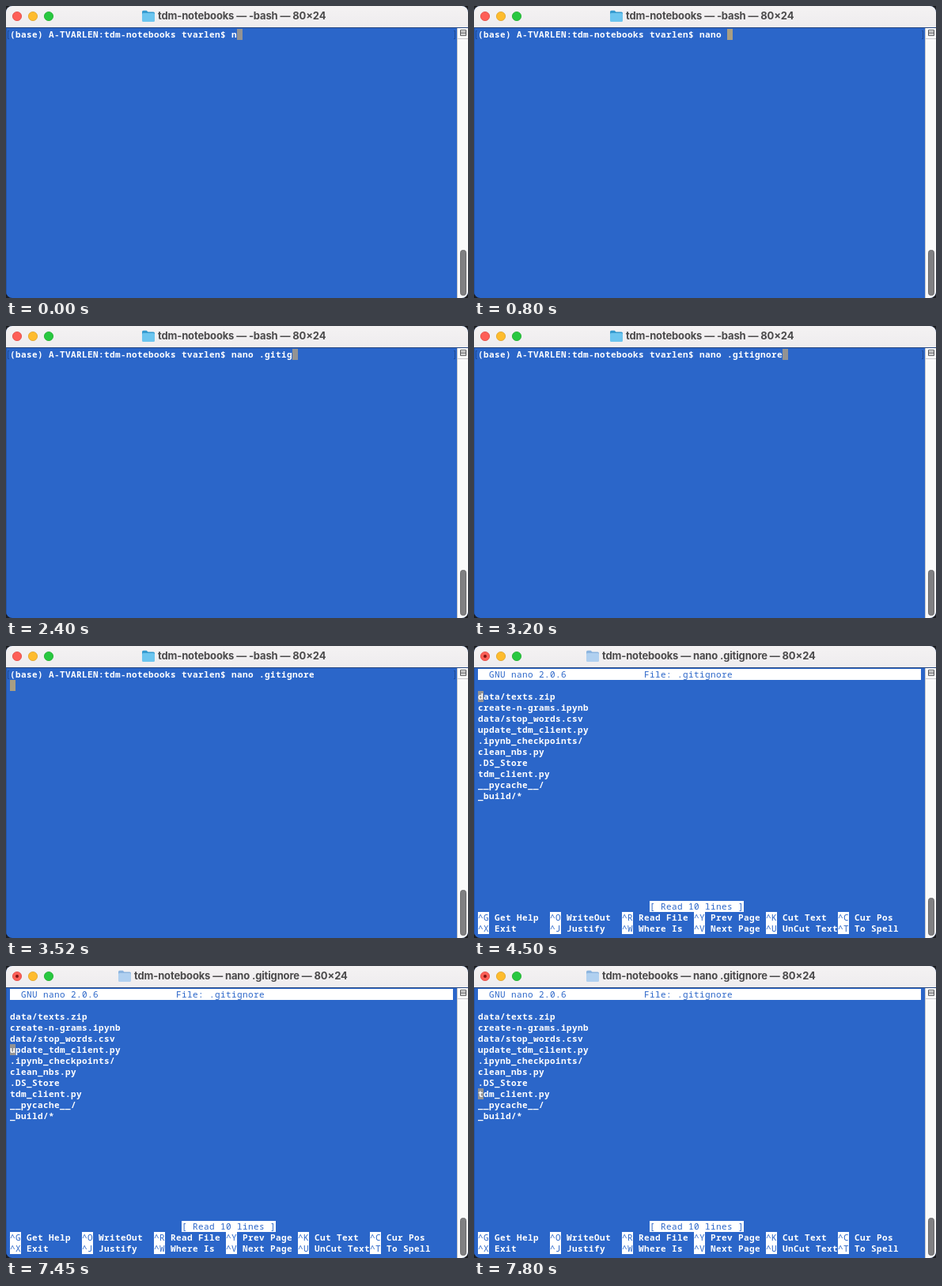
Write an HTML page that moves like this. It is 584 by 370 pixels and loops after 8 s.

```html
<!DOCTYPE html>
<html lang="en">
<head>
<meta charset="utf-8">
<title>Editing .gitignore</title>
<style>
  html, body { margin: 0; width: 100%; height: 100%; overflow: hidden; background: #1d1d1f; }
  svg { display: block; width: 584px; height: 370px; }
  text { white-space: pre; }
  .mono { font: 600 11px "Noto Sans Mono", monospace; letter-spacing: .4px; fill: #fff; }
  .inv { font-weight: 500; fill: #2b66c9; }
  .title { font: 700 13px Inter, sans-serif; letter-spacing: -.15px; fill: #4b4a4b; }
</style>
</head>
<body>
<svg id="stage" viewBox="0 0 584 370" xmlns="http://www.w3.org/2000/svg">
  <defs>
    <linearGradient id="bar" x2="0" y2="1">
      <stop stop-color="#f4f2f3"/><stop offset="1" stop-color="#eeecee"/>
    </linearGradient>
    <clipPath id="win"><rect width="584" height="370" rx="8"/></clipPath>
  </defs>
  <g clip-path="url(#win)">
    <rect width="584" height="370" fill="#2b66c9"/>
    <rect width="584" height="27" fill="url(#bar)"/>
    <rect x="570" y="27" width="14" height="343" fill="#fafafa"/>
    <path d="M570.5 27V370M571 41.5H584" stroke="#c9c9cb" fill="none"/>
    <path d="M0 27.5H584" stroke="#24457f"/>
    <path d="M.5 28V370" stroke="#2456ab"/>
    <path d="M574.5 30.5h7v7h-7zM574 33h8M574 35h8" stroke="#58585a" fill="none"/>
    <rect id="thumb" x="574.5" width="7" rx="3" fill="#808082" stroke="#6b6b6d"/>
    <g id="lights"></g>
    <circle id="dot" cx="14" cy="13" r="2" fill="#7d1512"/>
    <g id="folder">
      <path id="back" d="M0 7.5q0-1.7 1.7-1.7h4l1.8 1.7h6.8q1.7 0 1.7 1.7v8.8H0z"/>
      <rect id="front" y="9" width="16" height="11" rx="1.5"/>
    </g>
    <text id="title" class="title" y="17.4"></text>
    <g id="shell"></g>
    <g id="nano"></g>
    <rect id="cursor" width="7" height="14"/>
    <text id="under" class="mono"></text>
  </g>
</svg>
<script>
const LOOP = 8000, GRAY = '#939393', TAN = '#a99e82';
const PROMPT = '(base) A-TVARLEN:tdm-notebooks tvarlen$ ';
const COMMAND = 'nano .gitignore';
const FILES = ['data/texts.zip', 'create-n-grams.ipynb', 'data/stop_words.csv',
  'update_tdm_client.py', '.ipynb_checkpoints/', 'clean_nbs.py', '.DS_Store',
  'tdm_client.py', '__pycache__/', '_build/*'];
const KEYS = [
  ['G Get Help', 'O WriteOut', 'R Read File', 'Y Prev Page', 'K Cut Text', 'C Cur Pos'],
  ['X Exit', 'J Justify', 'W Where Is', 'V Next Page', 'U UnCut Text', 'T To Spell']];

// [start ms, characters typed] and [start ms, selected file]
const TYPED = [[0, 1], [200, 3], [400, 4], [800, 5], [1200, 6], [1400, 7],
  [1550, 9], [2000, 10], [2400, 11], [3200, 15]];
const MOVES = [[4500, 0], [7450, 3], [7600, 5], [7800, 7]];
const ENTER = 3400, OPEN = 4500;

const $ = id => document.getElementById(id);
const colX = c => 5 + 7 * c;
const rowY = r => 29 + 14 * r;

function add(parent, tag, attrs, text = '') {
  const el = document.createElementNS('http://www.w3.org/2000/svg', tag);
  set(el, attrs);
  el.textContent = text;
  return parent.appendChild(el);
}
function set(el, attrs) {
  for (const k in attrs) el.setAttribute(k, attrs[k]);
}
function print(parent, col, row, text, cls = 'mono') {
  return add(parent, 'text', { x: colX(col), y: rowY(row) + 11, class: cls }, text);
}
function printInverse(parent, col, row, text, cols = text.length) {
  add(parent, 'rect', { x: colX(col), y: rowY(row), width: 7 * cols, height: 14, fill: '#fff' });
  print(parent, col, row, text, 'mono inv');
}
function at(steps, t) {
  return steps.reduce((v, [start, value]) => t >= start ? value : v, steps[0][1]);
}

[['#fe5f57', '#e0443e'], ['#febc2e', '#dea123'], ['#28c840', '#1aab29']].forEach(([fill, stroke], i) =>
  add($('lights'), 'circle', { cx: 14 + 20 * i, cy: 13, r: 5.6, fill, stroke, 'stroke-width': .8 }));

const line = print($('shell'), 0, 0, '');
add($('shell'), 'path', { d: 'M4 31.5H2.5V41.5H4M566 31.5H567.5V41.5H566', stroke: '#1f4b96', fill: 'none' });

printInverse($('nano'), 0, 0, '  GNU nano 2.0.6', 80);
print($('nano'), 30, 0, 'File: .gitignore', 'mono inv');
FILES.forEach((name, i) => print($('nano'), 0, i + 2, name));
printInverse($('nano'), 31, 21, '[ Read 10 lines ]');
KEYS.forEach((keys, r) => keys.forEach((key, i) => {
  printInverse($('nano'), 13 * i, 22 + r, '^' + key[0]);
  print($('nano'), 13 * i + 3, 22 + r, key.slice(2));
}));

function draw(t) {
  const open = t >= OPEN, entered = t >= ENTER;
  const typed = at(TYPED, t), file = at(MOVES, t);
  const left = open ? 142 : 172;

  $('shell').style.display = open ? 'none' : '';
  $('nano').style.display = $('dot').style.display = open ? '' : 'none';
  $('title').textContent = `tdm-notebooks — ${open ? COMMAND : '-bash'} — 80×24`;
  set($('title'), { x: left + 20 });
  set($('folder'), { transform: `translate(${left})` });
  set($('back'), { fill: open ? '#8db5df' : '#369bd0' });
  set($('front'), { fill: open ? '#b0d0f0' : '#6cc5ef' });
  set($('thumb'), { y: open ? 319.5 : 309.5, height: open ? 47 : 57 });

  line.textContent = PROMPT + COMMAND.slice(0, typed);
  const col = open || entered ? 0 : PROMPT.length + typed;
  const row = open ? file + 2 : entered ? 1 : 0;
  const tan = !open && (t >= 3520 || t >= 800 && t < 1200);
  set($('cursor'), { x: colX(col), y: rowY(row), fill: tan ? TAN : GRAY });
  $('under').textContent = open ? FILES[file][0] : '';
  set($('under'), { x: colX(0), y: rowY(row) + 11 });
}

const begin = performance.now();
function tick() {
  draw((performance.now() - begin) % LOOP);
  requestAnimationFrame(tick);
}
tick();
</script>
</body>
</html>
```
